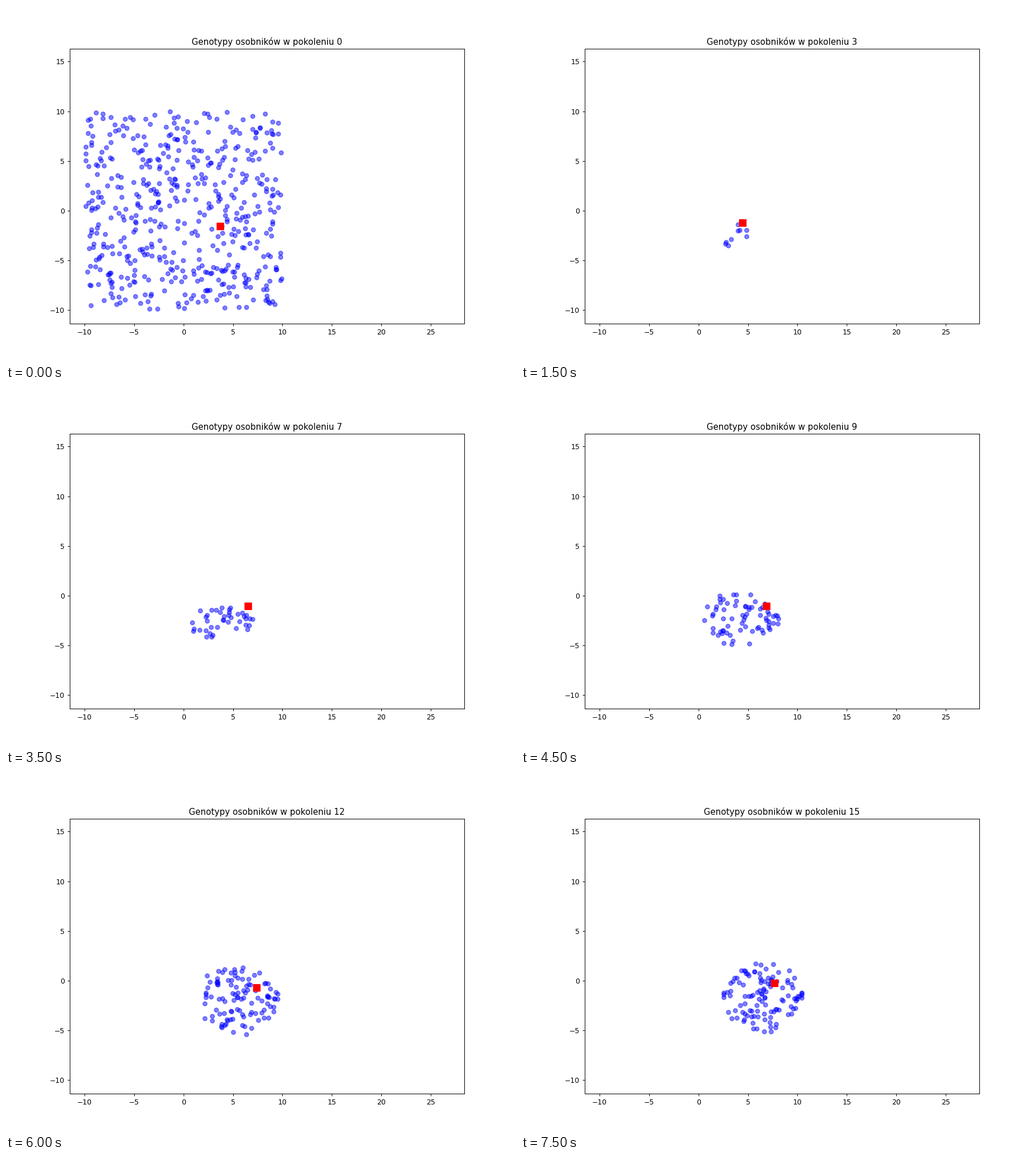
Animation, 894 px wide and 626 px high, one loop 8 s. Source, as a matplotlib script:

```python
import numpy as np
import matplotlib.pyplot as plt
from matplotlib.animation import FuncAnimation

GENERATIONS = 16
START_SIZE = 500

# Key generations: goal position, then centre and half-width of the cloud
KEYS = [1, 5, 7, 10, 12, 15]
GOAL_X = [3.87, 4.98, 6.52, 7.08, 7.38, 7.7]
GOAL_Y = [-1.53, -0.93, -1.07, -1.03, -0.68, -0.26]
MID_X = [3.5, 3.75, 3.9, 4.5, 5.6, 6.5]
MID_Y = [-2.0, -2.9, -2.65, -2.3, -2.0, -1.7]
HALF_X = [0.8, 2.6, 3.3, 4.0, 3.9, 3.95]
HALF_Y = [0.45, 1.9, 1.6, 3.0, 3.4, 3.4]


def key_value(gen, values):
    return np.interp(gen, KEYS, values)


def population_size(gen):
    """Logistic growth of the survivors."""
    return round(4 + 114 / (1 + np.exp((8.4 - gen) / 1.8)))


def population(gen):
    if gen == 0:
        return np.random.default_rng(7).uniform(-9.97, 9.97, (START_SIZE, 2))
    size = population_size(gen)
    rng = np.random.default_rng(21)
    radius, turn = rng.random((size, 2)).T
    angle = 2 * np.pi * turn
    unit = radius[:, None] ** 0.55 * np.column_stack(
        [np.cos(angle), np.sin(angle)])
    mutation = np.random.default_rng(gen).normal(0, 0.08, unit.shape)
    mid = key_value(gen, MID_X), key_value(gen, MID_Y)
    half = key_value(gen, HALF_X), key_value(gen, HALF_Y)
    return mid + half * np.array(unit + mutation).clip(-1, 1)


def goal_position(gen):
    if gen == 0:
        return 3.68, -1.57
    return key_value(gen, GOAL_X), key_value(gen, GOAL_Y)


fig, ax = plt.subplots(figsize=(10, 7.0023), dpi=89.4)
ax.set_xlim(-11.51, 28.38)
ax.set_ylim(-11.39, 16.28)
dots = ax.scatter([], [], color="blue", alpha=0.5)
goal = ax.scatter([], [], s=100, color="red", marker="s")
title = ax.set_title("")


def update(gen):
    dots.set_offsets(population(gen))
    goal.set_offsets([goal_position(gen)])
    title.set_text(f"Genotypy osobników w pokoleniu {gen}")
    return dots, goal, title


anim = FuncAnimation(fig, update, frames=GENERATIONS, interval=500,
                     repeat=True, repeat_delay=0)
plt.show()
```
